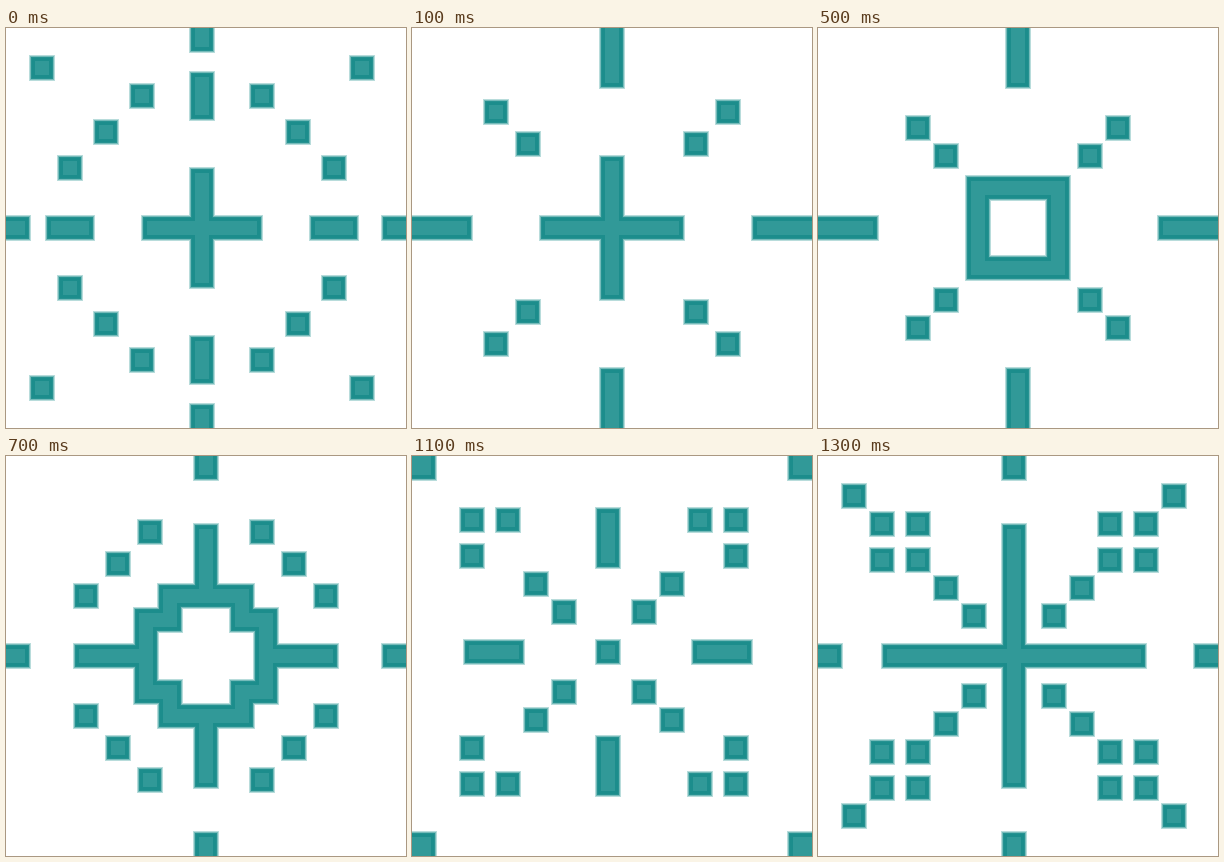
An HTML page with a canvas that plays this animation: 400 by 400 pixels, repeating every 1.5 s.

```html
<!DOCTYPE html>
<html lang="en">
<head>
<meta charset="utf-8">
<title>Pixel kaleidoscope</title>
<style>
html, body { margin: 0; width: 100%; height: 100%; overflow: hidden; background: #fff; }
canvas { display: block; width: 400px; height: 400px; }
</style>
</head>
<body>
<canvas id="stage" width="400" height="400"></canvas>
<script>
const ctx = document.getElementById('stage').getContext('2d');
const B = 24; // block size

// Soft rim, darker edge, then the body; each layer is inset further.
const LAYERS = [[-1, '#b8dcdb'], [0, '#76bbba'], [1, '#269291'], [2, '#1c8d8c'], [5, '#319998']];

const rect = (x, y, w = B, h = B) => [x, y, w, h];
const hbar = (y, from, to) => rect(from, y, to - from, B);
const vbar = (x, from, to) => rect(x, from, B, to - from);

// Mirrors blocks into all four quadrants around (cx, cy).
const quad = (cx, cy, ...points) => points.flatMap(([x, y]) => {
  const mx = 2 * cx - x - B, my = 2 * cy - y - B;
  return [rect(x, y), rect(mx, y), rect(x, my), rect(mx, my)];
});

const rim = (x, y, len = B) => [
  vbar(x, 0, len), vbar(x, 400 - len, 400),
  hbar(y, 0, len), hbar(y, 400 - len, 400)
];

const box = (left, top, right, bottom) => [
  hbar(top, left, right), hbar(bottom - B, left, right),
  vbar(left, top, bottom), vbar(right - B, top, bottom)
];

const ring = [
  hbar(128, 152, 248), hbar(248, 152, 248),
  vbar(128, 152, 248), vbar(248, 152, 248),
  ...[152, 224].flatMap(x => [vbar(x, 128, 176), vbar(x, 224, 272)]),
  ...[152, 224].flatMap(y => [hbar(y, 128, 176), hbar(y, 224, 272)])
];

const corners = quad(200, 200, [0, 0]);

const poses = [
  { start: 0, shapes: [
    ...rim(184, 188), hbar(188, 136, 256), vbar(184, 140, 260),
    hbar(188, 40, 88), hbar(188, 304, 352), vbar(184, 44, 92), vbar(184, 308, 356),
    ...quad(196, 200, [24, 28], [52, 128], [88, 92], [124, 56])
  ] },
  { start: 100, shapes: [
    ...rim(188, 188, 60), hbar(188, 128, 272), vbar(188, 128, 272),
    ...quad(200, 200, [72, 72], [104, 104])
  ] },
  { start: 300, shapes: [
    ...rim(188, 188), hbar(188, 68, 332), vbar(188, 68, 332),
    ...quad(200, 200, [88, 88], [120, 120])
  ] },
  { start: 500, shapes: [
    ...rim(188, 188, 60), ...box(148, 148, 252, 252),
    ...quad(200, 200, [88, 88], [116, 116])
  ] },
  { start: 700, shapes: [
    ...rim(188, 188), ...ring,
    hbar(188, 68, 152), hbar(188, 248, 332), vbar(188, 68, 152), vbar(188, 248, 332),
    ...quad(200, 200, [132, 64], [100, 96], [68, 128])
  ] },
  { start: 900, shapes: [
    ...corners, ...box(144, 144, 248, 248),
    hbar(184, 0, 60), hbar(184, 336, 396), vbar(184, 0, 60), vbar(184, 340, 400),
    ...quad(192, 196, [84, 88], [112, 116])
  ] },
  { start: 1100, shapes: [
    ...corners, rect(184, 184),
    hbar(184, 52, 112), hbar(184, 280, 340), vbar(184, 52, 112), vbar(184, 280, 340),
    ...quad(192, 196, [48, 52], [84, 52], [48, 88], [112, 116], [140, 144])
  ] },
  { start: 1300, shapes: [
    ...rim(184, 188), hbar(188, 64, 328), vbar(184, 68, 332),
    ...quad(196, 200, [24, 28], [52, 56], [88, 56], [52, 92], [88, 92], [116, 120], [144, 148])
  ] }
];

// Shapes touching the stage border run past it, so they get no rim there.
function bleed([x, y, w, h]) {
  const left = x === 0 ? -B : x, top = y === 0 ? -B : y;
  const right = x + w === 400 ? 400 + B : x + w;
  const bottom = y + h === 400 ? 400 + B : y + h;
  return [left, top, right - left, bottom - top];
}

function draw() {
  const time = performance.now() % 1500;
  const shapes = poses.findLast(pose => time >= pose.start).shapes.map(bleed);
  ctx.fillStyle = '#fff';
  ctx.fillRect(0, 0, 400, 400);
  for (const [inset, color] of LAYERS) {
    ctx.fillStyle = color;
    for (const [x, y, w, h] of shapes) {
      ctx.fillRect(x + inset, y + inset, w - 2 * inset, h - 2 * inset);
    }
  }
  requestAnimationFrame(draw);
}
draw();
</script>
</body>
</html>
```
